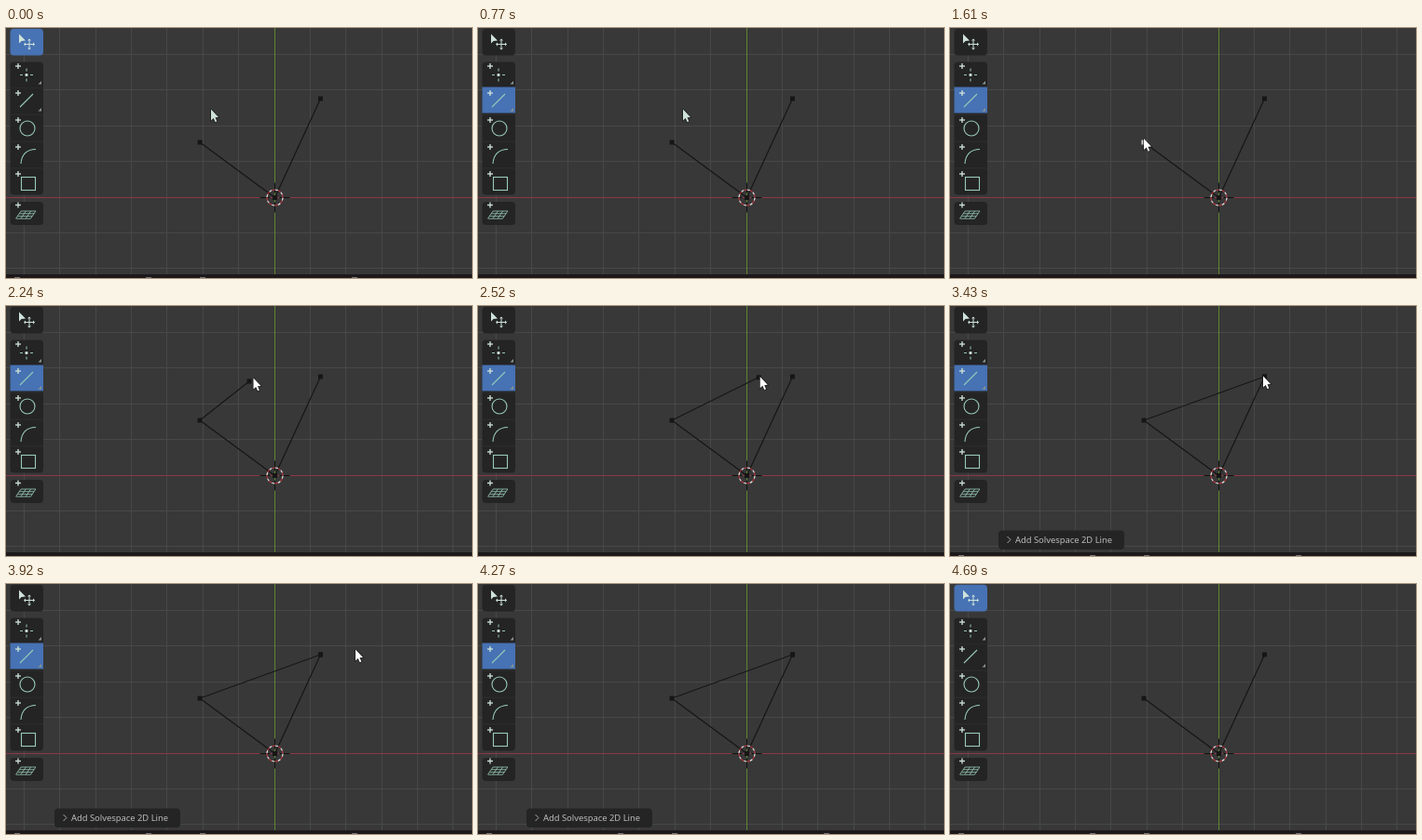
Animation of 500 by 269 pixels, one loop 4760 ms. Source, as an HTML page with a canvas:

```html
<!DOCTYPE html>
<html lang="en">
<head>
<meta charset="utf-8">
<style>
  html, body { margin: 0; width: 100%; height: 100%; overflow: hidden; background: #383838; }
  canvas { display: block; }
</style>
</head>
<body>
<canvas id="stage" width="500" height="269"></canvas>
<script>
const ctx = document.getElementById('stage').getContext('2d');
const LOOP = 4760, STEP = 70, CELL = 38.35;
const A = [208, 123], B = [337.5, 76], ORIGIN = [288.5, 182.5];
const INK = '#99cbb8', LIGHT = '#cfe3da', DARK = '#242424', BLUE = '#4772b3', SKETCH = '#161616';
const SIDES = [[1, 0], [-1, 0], [0, 1], [0, -1]];

// Key poses of the pointer: time, x, y
const poses = [
  [910, 219.5, 87], [1610, 207.5, 118.5], [1960, 207.5, 118.5], [2240, 265, 77],
  [2870, 328.5, 75], [3220, 335.5, 75], [3500, 335.5, 75], [3920, 374.5, 70],
  [4060, 469, 208], [4270, 480, 290]
];

function pointerAt(t) {
  const next = poses.findIndex(pose => pose[0] > t);
  if (next < 1) return poses.at(next).slice(1);
  const [t0, x0, y0] = poses[next - 1], [t1, x1, y1] = poses[next];
  const k = 1 - (1 - (t - t0) / (t1 - t0)) ** 1.5;
  return [x0 + (x1 - x0) * k, y0 + (y1 - y0) * k];
}

function trace(points) {
  ctx.beginPath();
  points.forEach(([x, y]) => ctx.lineTo(x, y));
}

function line(points, color, width = 1) {
  trace(points);
  ctx.strokeStyle = color;
  ctx.lineWidth = width;
  ctx.stroke();
}

function fillShape(points, color) {
  trace(points);
  ctx.fillStyle = color;
  ctx.fill();
}

function box(x, y, w, h, color, radius = 0) {
  ctx.beginPath();
  ctx.roundRect(x, y, w, h, radius);
  ctx.fillStyle = color;
  ctx.fill();
}

function circle(x, y, r, color, width) {
  ctx.beginPath();
  ctx.arc(x, y, r, 0, Math.PI * 2);
  ctx.strokeStyle = color;
  ctx.lineWidth = width;
  ctx.stroke();
}

const vertex = ([x, y], color = SKETCH) => box(x - 2.5, y - 2.5, 5, 5, color);

function drawGrid() {
  const [cx, cy] = ORIGIN;
  box(0, 0, 500, 269, '#383838');
  for (let k = -7; k < 6; k++) {
    const x = Math.round(cx + k * CELL) - .5, y = Math.round(cy + k * CELL) - .5;
    line([[x, 0], [x, 265]], '#484848');
    line([[0, y], [500, y]], '#484848');
  }
  box(0, cy - .5, 500, 1, '#8c3845');
  box(cx - .5, 0, 1, 265, '#5f8530');
}

function drawOriginMarker() {
  const [x, y] = ORIGIN, r = 8.5, dash = Math.PI * r / 8;
  for (const [dx, dy] of SIDES) {
    line([[x + dx * 5, y + dy * 5], [x + dx * 16, y + dy * 16]], '#111');
  }
  ctx.setLineDash([dash, dash]);
  circle(x, y, r, '#e6e2e2', 1.2);
  ctx.lineDashOffset = dash;
  circle(x, y, r, '#b8323a', 1.2);
  ctx.lineDashOffset = 0;
  ctx.setLineDash([]);
  vertex(ORIGIN);
}

function drawToolbar(lineActive) {
  box(4.5, .8, 35.5, 28.7, lineActive ? DARK : BLUE, 4);
  box(4.5, 36.5, 35.5, 143, DARK, 4);
  box(4.5, 187, 35.5, 25, DARK, 4);
  for (let i = 1; i < 5; i++) box(4.5, 35 + i * 28.9, 35.5, .7, '#303030');
  if (lineActive) box(4.5, 63.5, 35.5, 28, BLUE);

  // Select arrow, move cross and point ticks
  fillShape([[14, 6.5], [14, 16.5], [16.6, 14], [21, 13.5]], LIGHT);
  for (const [dx, dy] of SIDES) {
    const x = 25 + dx * 4, y = 17.5 + dy * 4;
    line([[25, 17.5], [x, y]], LIGHT);
    fillShape([[x + dx * 2, y + dy * 2], [x + dy * 2, y + dx * 2], [x - dy * 2, y - dx * 2]], LIGHT);
    line([[22 + dx * 4, 50.5 + dy * 4], [22 + dx * 7, 50.5 + dy * 7]], INK);
  }
  box(20.5, 49, 3, 3, LIGHT, 1);

  line([[15, 85], [29, 71]], INK, 1.1);
  circle(23, 108, 8, INK, 1.1);
  ctx.beginPath();
  ctx.moveTo(16, 146);
  ctx.quadraticCurveTo(17, 131, 32, 130.5);
  ctx.stroke();
  ctx.strokeRect(16.5, 160.5, 15, 14);

  // Workplane: slanted mesh
  for (let i = 0; i < 4; i++) {
    const y = 197 + i * 2.7, x = 16 - i * 1.8;
    line([[x, y], [x + 16, y]], INK, .8);
    line([[16 + i * 5.3, 197], [10.6 + i * 5.3, 205]], INK, .8);
  }

  for (let i = 0; i < 6; i++) {
    const y = i < 5 ? 41 + i * 29 : 190.5;
    line([[10, y], [16, y]], LIGHT, 1.3);
    line([[13, y - 3], [13, y + 3]], LIGHT, 1.3);
    if (i < 2) fillShape([[38, y + 16], [38, y + 19.5], [34.5, y + 19.5]], '#8d9893');
  }
}

function drawStatus(visible) {
  box(0, 265, 500, 4, '#1d191b');
  if (visible) for (const x of [9, 150, 208, 371]) box(x, 268, 6, 1, '#77747a');
}

function drawPanel() {
  box(52, 241.5, 135, 20.5, DARK, 4);
  line([[61.5, 248], [65, 251.5], [61.5, 255]], '#a8a8a8');
  ctx.fillStyle = '#bcbcbc';
  ctx.font = '9.4px "Noto Sans", sans-serif';
  ctx.fillText('Add Solvespace 2D Line', 70, 255);
}

function drawPointer([x, y], color) {
  const shape = [[0, 0], [0, 12], [2.7, 9.5], [4.6, 13.8], [6.3, 13], [4.5, 8.8], [8, 8.5], [0, 0]]
    .map(([dx, dy]) => [x + dx + .5, y + dy + .5]);
  line(shape, '#1c1c1c', 1.4);
  fillShape(shape, color);
}

function draw(now) {
  const t = Math.floor(now % LOOP / STEP) * STEP;
  const during = (from, to) => t >= from && t < to;
  const pointer = pointerAt(t);

  drawGrid();
  line([A, ORIGIN, B], SKETCH, 1.2);
  if (during(2030, 4690)) {
    const lag = t < 2450 ? 4 : 1;
    const end = t < 3220 ? [pointer[0] - lag, pointer[1] + lag] : B;
    line([A, end], SKETCH, 1.2);
    vertex(end);
  }
  vertex(A, during(1610, 2030) ? '#d8d8d8' : SKETCH);
  vertex(B);
  drawOriginMarker();
  drawToolbar(during(770, 4690));
  if (during(3430, 4690)) drawPanel();
  drawStatus(!during(770, 3430));
  if (t < 4270) drawPointer(pointer, t < 980 ? '#cfe2d9' : '#fff');
}

const start = performance.now();
function tick() {
  draw(performance.now() - start);
  requestAnimationFrame(tick);
}
tick();
</script>
</body>
</html>
```
